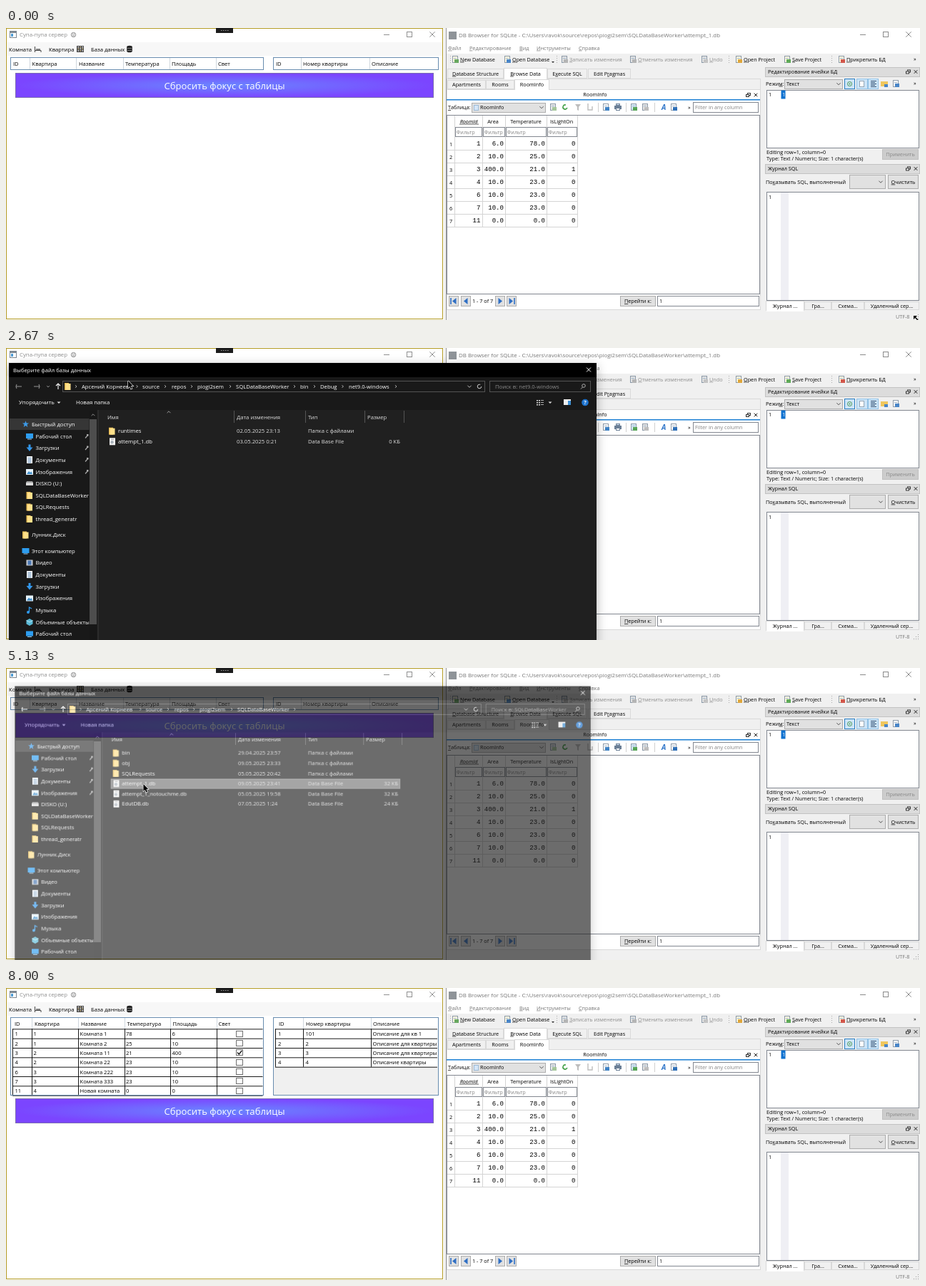
An HTML page with a canvas for the animation above (8.34 s loop, 1280 by 410 pixels).

```html
<!DOCTYPE html>
<html lang="ru">
<head>
<meta charset="utf-8">
<title>Супа-пупа сервер</title>
<style>
html, body { margin: 0; width: 100%; height: 100%; overflow: hidden; background: #fff; }
canvas { display: block; }
</style>
</head>
<body>
<canvas id="stage" width="1280" height="410"></canvas>
<script>
const LOOP = 8340, TICK = 200 / 3;
const UI = '"Open Sans", "Noto Sans", sans-serif';
const MONO = '"Liberation Mono", "DejaVu Sans Mono", monospace';
const stage = document.getElementById('stage').getContext('2d');
let g = stage;

// ---------- drawing helpers ----------
function rect(x, y, w, h, fill, stroke) {
  if (fill) { g.fillStyle = fill; g.fillRect(x, y, w, h); }
  if (stroke) { g.strokeStyle = stroke; g.lineWidth = 1; g.strokeRect(x + .5, y + .5, w - 1, h - 1); }
}
function line(color, width, ...p) {
  g.strokeStyle = color; g.lineWidth = width;
  g.beginPath();
  for (let i = 0; i < p.length; i += 2) g.lineTo(p[i], p[i + 1]);
  g.stroke();
}
function poly(color, ...p) {
  g.fillStyle = color;
  g.beginPath();
  for (let i = 0; i < p.length; i += 2) g.lineTo(p[i], p[i + 1]);
  g.fill();
}
function disc(x, y, r, fill, stroke) {
  g.beginPath(); g.arc(x, y, r, 0, 7);
  if (fill) { g.fillStyle = fill; g.fill(); }
  if (stroke) { g.strokeStyle = stroke; g.lineWidth = 1; g.stroke(); }
}
// y is the middle of the capitals; "&" underlines the next letter
function text(s, x, y, { size = 7.25, color = '#000', align = 'left', font = UI, style = '' } = {}) {
  const mark = s.indexOf('&'), plain = s.replace('&', ''), base = y + size * .36;
  g.font = `${style} ${size}px ${font}`;
  g.fillStyle = color; g.textAlign = align;
  g.fillText(plain, x, base);
  if (mark < 0) return;
  const left = align === 'center' ? x - g.measureText(plain).width / 2 : x;
  g.fillRect(left + g.measureText(plain.slice(0, mark)).width, base + 1, g.measureText(plain[mark]).width, .7);
}
function chevron(x, y, dir, color, r = 1.8) {
  const d = { '>': [-1, -2, 1, 0, -1, 2], 'v': [-2, -1, 0, 1, 2, -1], '^': [-2, 1, 0, -1, 2, 1] }[dir];
  line(color, .9, ...d.map((v, i) => (i % 2 ? y : x) + v * r / 2));
}
function cross(x, y, r, color) {
  line(color, 1, x - r, y - r, x + r, y + r);
  line(color, 1, x - r, y + r, x + r, y - r);
}
function caption(x, color) {
  rect(x - 68, 9, 8, 1, color);
  rect(x - 36, 5, 8, 8, null, color);
  cross(x, 9, 3.7, color);
}
function layer(paint, h = 410) {
  const c = document.createElement('canvas'), prev = g;
  c.width = 1280; c.height = h;
  g = c.getContext('2d');
  paint();
  g = prev;
  return c;
}

// ---------- icons ----------
function folder(x, y) {
  rect(x, y - 5, 6, 10, '#e9bd55');
  rect(x + 1.5, y - 4, 7, 9, '#ffe08a');
}
function dbFile(x, y) {
  rect(x + 1, y - 5, 8, 10, '#f4f4f4');
  disc(x + 4.5, y + 1, 2.2, '#a9b2bb');
  line('#8a8a8a', .7, x + 3, y - 3, x + 7, y - 3);
}
function page(x, y, dot, paper = '#fff') {
  rect(x - 4, y - 5, 8, 10, paper, '#8b99a8');
  rect(x - 2, y - 2, 4, 1, '#9fb4c9');
  rect(x - 1, y, 6, 5, dot);
}
function drum(x, y, color) {
  g.fillStyle = color;
  g.beginPath();
  g.ellipse(x, y - 3, 3.8, 1.8, 0, Math.PI, 0);
  g.ellipse(x, y + 3, 3.8, 1.8, 0, 0, Math.PI);
  g.fill();
}
const sideIcons = {
  star(x, y) {
    const p = [];
    for (let i = 0; i < 10; i++) {
      const r = i % 2 ? 2 : 4.8, a = i * Math.PI / 5 - Math.PI / 2;
      p.push(x + r * Math.cos(a), y + r * Math.sin(a));
    }
    poly('#3d9be9', ...p);
  },
  desk(x, y) { rect(x - 5, y - 4, 10, 7, '#2d9df0'); rect(x - 3, y + 3.5, 6, 1, '#9ed2f7'); },
  down(x, y) { rect(x - 1.5, y - 5, 3, 5, '#3397ec'); poly('#3397ec', x - 4.5, y - 1, x + 4.5, y - 1, x, y + 4.5); },
  doc(x, y) { rect(x - 4, y - 5, 8, 10, '#eef3f8'); for (let i = -3; i < 4; i += 2) rect(x - 2.5, y + i, 5, .8, '#5b87b5'); },
  pic(x, y) { rect(x - 5, y - 4, 10, 8, '#e6f3fb'); poly('#3e8ecb', x - 4, y + 3, x - 1, y - 1, x + 1, y + 1, x + 2.5, y - .5, x + 4, y + 3); },
  drive(x, y) { rect(x - 5, y - 1, 10, 4, '#d9d9d9'); poly('#9c9c9c', x - 4, y - 3, x + 4, y - 3, x + 5, y - 1, x - 5, y - 1); },
  dir(x, y) { folder(x - 4.5, y); },
  film(x, y) { rect(x - 4.5, y - 4, 9, 8, '#c9cdd2'); rect(x - 2.5, y - 3, 5, 6, '#4a78b5'); },
  note(x, y) { disc(x - 2, y + 3, 2, '#2f9bf0'); line('#2f9bf0', 1.3, x - .5, y + 3, x - .5, y - 4, x + 3, y - 2); },
  cube(x, y) { poly('#59b9d6', x, y - 5, x + 4.5, y - 2.5, x + 4.5, y + 2.5, x, y + 5, x - 4.5, y + 2.5, x - 4.5, y - 2.5); line('#d7f1f8', .8, x - 4.5, y - 2.5, x, y, x + 4.5, y - 2.5); }
};

// ---------- data ----------
const rooms = [
  [1, 1, 'Комната 1', 78, 6], [2, 1, 'Комната 2', 25, 10], [3, 2, 'Комната 11', 21, 400],
  [4, 2, 'Комната 22', 23, 10], [6, 3, 'Комната 222', 23, 10], [7, 3, 'Комната 333', 23, 10],
  [11, 4, 'Новая комната', 0, 0]
];
const flats = [[1, 101, 'Описание для кв 1'], [2, 2, 'Описание для квартиры 2'], [3, 3, 'Описание для квартиры 3'], [4, 4, 'Описание квартиры']];
const buildFiles = [['runtimes', '02.05.2025 23:13'], ['attempt_1.db', '03.05.2025 0:21', '0 КБ']];
const projectFiles = [
  ['bin', '29.04.2025 23:57'], ['obj', '09.05.2025 23:33'], ['SQLRequests', '05.05.2025 20:42'],
  ['attempt_1.db', '09.05.2025 23:41', '32 КБ'], ['attempt_1_notouchme.db', '05.05.2025 19:58', '32 КБ'],
  ['EdutDB.db', '07.05.2025 1:24', '24 КБ']
];
const crumbs = [['Арсений Корнеев', 106, 183.5], ['source', 191, 223], ['repos', 232, 260], ['piogi2sem', 268, 314],
  ['SQLDataBaseWorker', 322, 404], ['bin', 412, 432], ['Debug', 440, 471.5], ['net9.0-windows', 480, 546]];
const places = [
  ['star', 'Быстрый доступ', 107], ['desk', 'Рабочий стол', 124], ['down', 'Загрузки', 140.5], ['doc', 'Документы', 157],
  ['pic', 'Изображения', 174], ['drive', 'DISKO (U:)', 190], ['dir', 'SQLDataBaseWorker', 207], ['dir', 'SQLRequests', 223.5],
  ['dir', 'thread_generatr', 240], ['dir', 'Лунник.Диск', 262.5], ['desk', 'Этот компьютер', 285], ['film', 'Видео', 301.5],
  ['doc', 'Документы', 318], ['down', 'Загрузки', 335], ['pic', 'Изображения', 351.5], ['note', 'Музыка', 368],
  ['cube', 'Объемные объекты', 385], ['desk', 'Рабочий стол', 401.5]
];

// ---------- database browser (never changes) ----------
function field(x, y, w, h) { rect(x, y, w, h, '#fff', '#828790'); }
function button(x, y, w, h, label, color) {
  rect(x, y, w, h, '#e1e1e1', '#adadad');
  if (label) text(label, x + w / 2, y + h / 2, { align: 'center', color });
}
function dock(label, y) {
  rect(1063, y, 217, 14, '#dcdcdc', '#c2c2c2');
  text(label, 1067, y + 6.5);
  dockButtons(1263, y + 6.5);
}
function dockButtons(x, y) {
  rect(x - 1, y - 3, 5, 4, null, '#333');
  rect(x - 3, y - 1, 5, 4, '#eee', '#333');
  cross(x + 11, y, 2.3, '#222');
}
function tabs(list, y, h) {
  for (const [label, x, w, on] of list) {
    rect(x, y - (on ? 1 : 0), w, h + (on ? 2 : 0), on ? '#fff' : '#f0f0f0', '#d9d9d9');
    if (on) rect(x + 1, y + h - 1, w - 2, 3, '#fff');
    text(label, x + w / 2, y + h / 2, { align: 'center' });
  }
}
function browserToolbar() {
  const dim = '#8d8d8d';
  for (const [label, x, c, off] of [
    ['&New Database', 636, '#68a860'], ['&Open Database', 709, '#4a86c8'], ['&Записать изменения', 789, '#b5b5b5', 1],
    ['&Отменить изменения', 885, '#b5b5b5', 1], ['&Undo', 985, '#c4c4c4', 1], ['&Open Project', 1033, '#e0a73d'],
    ['&Save Project', 1101, '#5faa58'], ['&Прикрепить БД', 1177, '#d2574b']]) {
    page(x - 7, 44, c, off ? '#e4e4e4' : '#fff8e0');
    text(label, x, 44, { color: off ? dim : '#000' });
  }
  poly('#222', 764, 47, 768, 47, 766, 49);
  for (const x of [622, 771, 1012, 1156]) for (let y = 39; y < 51; y += 3) rect(x, y, 1, 1, '#aaa');
  text('»', 1271, 43.5);
}
function tablePane() {
  rect(617, 71, 440, 325, '#fff', '#d9d9d9');
  tabs([['&Database Structure', 618, 79], ['&Browse Data', 697, 61, 1], ['E&xecute SQL', 758, 56], ['Edit P&ragmas', 815, 60]], 57, 14);
  rect(618, 72, 438, 15, '#f0f0f0');
  tabs([['Apartments', 618, 54], ['Rooms', 672, 40], ['RoomInfo', 712, 49, 1]], 73, 13);
  line('#d9d9d9', 1, 617, 86.5, 712, 86.5); line('#d9d9d9', 1, 761, 86.5, 1056, 86.5);
  text('RoomInfo', 825, 93.5, { align: 'center' });
  dockButtons(1039, 94);
  rect(617, 100, 439, 1.5, '#1a7fd4');

  text('&Таблица:', 619, 111.5);
  button(652, 105, 104, 14);
  rect(655, 108, 7, 8, '#d5e6f7', '#9dbbd8');
  text('RoomInfo', 664, 111.5);
  chevron(750, 111.5, 'v', '#444', 2.6);
  page(766, 111, '#a5c79b', '#e8e8e8');
  g.beginPath(); g.arc(783, 111, 3, .3, 5); g.strokeStyle = '#43a047'; g.lineWidth = 1.6; g.stroke();
  poly('#bdbdbd', 797, 107, 805, 107, 802, 111, 802, 116, 800, 115, 800, 111);
  line('#bdbdbd', 1.4, 815, 106, 815, 115, 821, 115, 821, 110);
  page(840, 111, '#3f83c6');
  rect(852, 109, 10, 5, '#6b7f96'); rect(854, 106, 6, 3, '#d7e6f5', '#6b7f96'); rect(854, 112, 6, 4, '#fff', '#6b7f96');
  page(879, 111, '#57a657', '#d7ecf9'); page(895, 111, '#bdbdbd', '#e4e4e4');
  text('A', 918, 111, { size: 10, color: '#2e75c8', style: 'italic bold' });
  page(935, 111, '#2f70b8');
  for (const x of [829, 868, 908]) rect(x, 105, 1, 13, '#d0d0d0');
  text('»', 955, 111);
  field(962, 104, 92, 15);
  text('Filter in any column', 965, 111.5, { color: '#808080' });

  rect(617, 122, 439, 252, '#fff', '#828790');
  const cols = [628, 667, 699, 757, 800];
  [['RoomId', 648], ['Area', 682], ['Temperature', 728], ['IsLightOn', 778]].forEach(([s, x], i) => {
    text(s, x, 131, { align: 'center', style: i ? '' : 'italic' });
    if (!i) rect(635, 134.7, 27, .7, '#222');
    field(cols[i] + 1, 139, cols[i + 1] - cols[i] - 1, 14);
    text('Фильтр', cols[i] + 2.5, 146, { color: '#858585' });
  });
  for (const x of cols) rect(x, 123, 1, 156, '#d4d4d4');
  rooms.forEach(([id, , , temp, area], i) => {
    const y = 162 + i * 18;
    rect(618, y + 9, 183, 1, '#d4d4d4');
    text(String(i + 1), 621, y + 1);
    [id, area.toFixed(1), temp.toFixed(1), id === 3 ? 1 : 0].forEach((v, k) =>
      text(String(v), [664.5, 697, 755, 797.5][k], y, { size: 9.1, font: MONO, align: 'right' }));
  });

  for (const [x, dir, bar] of [[620, -1, 1], [637, -1], [685, 1], [701, 1, 1]]) {
    button(x, 376, 14, 15);
    const c = x + 7 + (bar ? dir * -1 : 0);
    poly('#2f6fc4', c + dir * 3, 383.5, c - dir * 2.5, 379, c - dir * 2.5, 388);
    if (bar) rect(x + 6.2 + dir * 4, 379, 1.6, 9, '#2f6fc4');
  }
  text('1 - 7 of 7', 653, 383.5);
  button(860, 376, 50, 15, '&Перейти к:');
  field(912, 376, 143, 15);
  text('1', 915, 383.5);
}
function cellPane() {
  dock('Редактирование ячейки БД', 55);
  text('Режи&м:', 1064, 78);
  button(1090, 72, 82, 14);
  text('Текст', 1093, 78.5);
  chevron(1166, 78.5, 'v', '#444', 2.6);
  rect(1174, 71, 15, 15, '#cce4f7', '#2a7cc0');
  disc(1181.5, 78.5, 3, null, '#4e9a4e'); disc(1181.5, 78.5, 1, '#4e9a4e');
  rect(1191, 71, 16, 15, '#cce4f7', '#90c0e4'); rect(1207, 71, 15, 15, '#cce4f7', '#90c0e4');
  rect(1195, 74, 7, 9, '#fff', '#93a5b5');
  for (let y = 74; y < 84; y += 2) rect(1211, y, y % 4 ? 8 : 6, 1, '#3b5878');
  rect(1225, 75, 10, 7, '#f0c75e'); rect(1230, 79, 5, 4, '#4a86c8');
  page(1246, 78, '#4a86c8');
  text('»', 1271, 77);
  field(1065, 87, 214, 82);
  text('1', 1068, 93.5);
  rect(1085.5, 87.5, 6, 12, '#0f72d0');
  text('1', 1087, 93.5, { color: '#fff' });
  text('Editing row=1, column=0', 1065, 174);
  text('Type: Text / Numeric; Size: 1 character(s)', 1065, 183);
  rect(1227, 170, 51, 15, '#ccc', '#bfbfbf');
  text('Применить', 1252.5, 177.5, { align: 'center', color: '#888' });
  dock('Журнал SQL', 191);
  text('По&казывать SQL, выполненный', 1064, 216);
  button(1181, 206, 51, 20);
  chevron(1225, 216, 'v', '#444', 2.6);
  button(1235, 206, 43, 20, '&Очистить');
  field(1065, 230, 214, 153);
  rect(1085, 231, 11, 151, '#efeff4');
  text('1', 1068, 237);
  tabs([['Журнал ...', 1064, 54, 1], ['Гра...', 1118, 38], ['Схема...', 1156, 46], ['Удаленный сер...', 1202, 77]], 384, 12);
  text('UTF-8', 1246, 405, { color: '#777' });
  for (let i = 0; i < 3; i++) for (let k = 0; k <= i; k++) rect(1277 - k * 3, 402 + i * 3, 1, 1, '#999');
}
const browser = layer(() => {
  rect(613, 0, 667, 410, '#f0f0f0');
  rect(617, 0, 663, 36, '#fff');
  rect(616, 0, 1, 410, '#9a9a9a');
  rect(620, 5, 11, 11, '#8f9499');
  text('DB Browser for SQLite - C:\\Users\\ravok\\source\\repos\\piogi2sem\\SQLDataBaseWorker\\attempt_1.db', 634, 10, { size: 7.9, color: '#777' });
  caption(1264, '#8a8a8a');
  [['&Файл', 619], ['&Редактирование', 649], ['&Вид', 719], ['&Инструменты', 743], ['&Справка', 802]]
    .forEach(([s, x]) => text(s, x, 28, { color: '#777' }));
  browserToolbar();
  tablePane();
  cellPane();
});

// ---------- server window ----------
function grid(x, w, heads, seps, filled) {
  const h = filled ? 110 : 18;
  rect(x, 41, w, h, filled ? '#f0f0f0' : '#fff');
  rect(x, 41, w, 17, '#fff');
  for (const s of seps) rect(s, 42, 1, 16, '#cfd6dd');
  for (const [label, tx] of heads) text(label, tx, 50.5, { size: 7.6 });
  return () => rect(x, 41, w, h, null, '#688caf');
}
function rows(list, x0, x1, seps, xs) {
  const top = 57.4, step = 13.33, h = list.length * step;
  rect(x0, top, x1 - x0, h, '#fff');
  for (let i = 0; i <= list.length; i++) rect(x0, top + i * step, x1 - x0, .9, '#000');
  for (const s of [x0, ...seps]) rect(s, top, .9, h, '#000');
  list.forEach((r, i) => xs.forEach((x, k) => text(String(r[k]), x, top + i * step + 7.1, { size: 7.6 })));
}
function tables(filled) {
  const names = ['ID', 'Квартира', 'Название', 'Температура', 'Площадь', 'Свет'], names2 = ['ID', 'Номер квартиры', 'Описание'];
  const heads = (n, xs) => n.map((s, i) => [s, xs[i]]);
  const seps = filled ? [36, 101, 166, 230, 295] : [33, 98, 164, 229, 294];
  const seps2 = filled ? [416, 511] : [413, 509];
  let frame = grid(6, 355, heads(names, filled ? [12, 40, 105, 169.5, 233.5, 297.5] : [10, 36.5, 102, 167, 232, 297]), seps, filled);
  if (filled) {
    rows(rooms, 9, 359.5, seps, [12.5, 38.5, 103.5, 168, 232.5]);
    rooms.forEach(([id], i) => {
      const y = Math.round(59.6 + i * 13.33);
      rect(322, y, 10, 9, '#fff', '#707070');
      if (id === 3) line('#111', 1.4, 324, y + 4.5, 326.3, y + 7, 330.3, y + 2);
    });
  }
  frame();
  frame = grid(374, 232, heads(names2, filled ? [382, 420, 514] : [378, 416, 512]), seps2, filled);
  if (filled) {
    g.save();
    g.beginPath(); g.rect(374, 41, 230, 110); g.clip();
    rows(flats, 377, 605, seps2, [381, 419.5, 513.5]);
    g.restore();
  }
  frame();
}
function focusButton(y, hover) {
  if (hover) rect(13, y, 586, 35, '#bee6fd', '#7fa9c9');
  else {
    g.save();
    g.beginPath(); g.rect(13, y, 586, 35); g.clip();
    g.translate(306, y + 17.5); g.scale(293, 17.5);
    const glow = g.createRadialGradient(0, 0, 0, 0, 0, 1);
    glow.addColorStop(0, '#6a86ff'); glow.addColorStop(1, '#7b45ff');
    g.fillStyle = glow; g.fillRect(-1, -1, 2, 2);
    g.restore();
    rect(13, y, 586, 35, null, '#7a6bb0');
  }
  text('Сбросить фокус с таблицы', 306, y + 18, { size: 13.1, color: '#fff', align: 'center' });
}
function inside(p, x, y, w, h) { return p.x >= x && p.x < x + w && p.y >= y && p.y < y + h; }
function server(t, p) {
  const active = t >= 925 && t < 2125 || t >= 5200 && t < 7995;
  const filled = t >= 5200, open = t >= 1000 && t < 2060, covered = t >= 2060 && t < 5200;
  const ink = active ? '#000' : '#8f8f8f';
  rect(0, 0, 613, 410, '#fff');
  rect(5, 4, 10, 10, '#fff', '#7d8790'); rect(5, 4, 10, 3, '#7d8790'); rect(7, 8, 3, 4, '#4b9ad4');
  text('Супа-пупа сервер', 19, 9.5, { size: 7.8, color: ink });
  disc(94.5, 9.5, 3.2, '#ededed', ink);
  rect(93, 8, 1, 1, ink); rect(95, 8, 1, 1, ink); rect(93, 10.5, 3, .8, ink);
  caption(597, ink);

  rect(1, 20, 611, 19, '#f7f7f7');
  if (open || !covered && inside(p, 114, 20, 69, 18)) rect(114, 20, 69, 18, '#bddcec', '#6db4da');
  text('Комната', 4, 30, { size: 7.7 }); text('Квартира', 60, 30, { size: 7.7 }); text('База данных', 119, 30, { size: 7.7 });
  line('#444', 1, 40.5, 26, 40.5, 34); line('#444', 1, 40, 31.5, 49, 31.5, 49, 34); rect(42, 29, 6, 2, '#888');
  rect(99, 25, 10, 9, '#444');
  for (let i = 0; i < 9; i++) rect(100.5 + i % 3 * 3, 26 + (i / 3 | 0) * 2.6, 1.6, 1.4, i % 2 ? '#f0d9a0' : '#fff');
  drum(173, 29.5, '#222'); rect(170, 28, 6, .7, '#aaa'); rect(170, 31, 6, .7, '#aaa');

  tables(filled);
  const by = filled ? 155 : 63;
  focusButton(by, !covered && !open && inside(p, 13, by, 586, 34));
  rect(0, 0, 612, 409, null, '#b39b24');

  if (open) {
    g.globalAlpha = Math.min(1, (t - 930) / 200);
    rect(114, 38, 175, 19, '#f0f0f0', '#999');
    if (inside(p, 114, 39, 175, 18)) rect(116, 40, 171, 15, '#c6e0ee', '#7dbbdc');
    text('Подключить базу данных', 141, 48, { size: 7.7 });
    line('#333', 3, 243.5, 50.5, 249, 45.5); line('#eee', 1, 244.5, 49.5, 248, 46.5);
    g.globalAlpha = 1;
  }
}

// ---------- file dialog ----------
function dialog(t, p) {
  const W = '#fff', lbl = (s, x, y, color = W, align) => text(s, x, y, { size: 7.7, color, align });
  const moved = t >= 3595, short = t >= 3665, picked = t >= 4925;
  rect(4, 21, 823, 450, '#191919');
  rect(4, 21, 823, 20, '#000');
  lbl('Выберите файл базы данных', 10, 31);
  cross(816, 30.5, 3, '#fff');

  const arrow = (x, d, c) => { line(c, 1.1, x - 4, 54, x + 4, 54); line(c, 1.1, x + d, 51, x + d * 4 / 3, 54, x + d, 57); };
  arrow(18, -3, moved ? '#fff' : '#8a8a8a'); arrow(43, 3, '#8a8a8a');
  chevron(59, 54, 'v', '#aaa');
  line('#fff', 1.1, 73, 58, 73, 50); line('#fff', 1.1, 70, 53, 73, 50, 76, 53);
  rect(79, 46, 592, 16, '#191919', '#535353');
  folder(82, 54);
  chevron(98, 54, '>', '#ccc');
  const hot = t >= 3195 && !short, pressed = t >= 3395 && !short;
  if (hot && !pressed) rect(320, 47, 89, 13, '#2f2f2f');
  crumbs.slice(0, short ? 5 : 8).forEach(([s, x, sep], i) => {
    const shift = i === 4 && pressed ? .8 : 0;
    lbl(s, x + shift, 54 + shift);
    chevron(sep, 54, i === 4 && t >= 3395 && t < 3865 ? 'v' : '>', '#ccc');
  });
  chevron(649, 54, 'v', '#ccc', 2.6);
  g.beginPath(); g.arc(663, 54, 2.8, 0, 5.2); g.strokeStyle = '#ccc'; g.lineWidth = 1; g.stroke();
  rect(677, 46, 142, 16, '#191919', '#535353');
  lbl('Поиск в: ' + (short ? 'SQLDataBaseWorker' : 'net9.0-windows'), 685, 54, '#8c8c8c');
  disc(809, 53, 2.3, null, '#aaa'); line('#aaa', 1, 807.5, 55, 805, 57.5);

  lbl('Упорядочить', 18, 76.5); poly('#ddd', 71.5, 75.5, 76.5, 75.5, 74, 78);
  lbl('Новая папка', 98, 76.5);
  for (const y of [73, 76, 79]) { rect(743, y, 2, 1.5, '#ddd'); rect(746, y, 2, 1.5, '#ddd'); rect(749, y, 4, 1, '#aaa'); }
  poly('#ddd', 759.5, 75.5, 764.5, 75.5, 762, 78);
  rect(781, 72, 10, 8, '#eee'); rect(787, 74, 4, 6, '#3b8fd4');
  disc(811, 76.5, 4.8, '#1e74cf');
  text('?', 811, 76.5, { size: 7.5, color: '#fff', align: 'center', style: 'bold' });

  rect(130, 87, 697, 384, '#202020');
  g.save();
  g.beginPath(); g.rect(4, 87, 112.5, 384); g.clip();
  rect(5, 99, 112, 16, '#363636');
  places.forEach(([icon, s, y]) => {
    const root = icon === 'star' || s.includes('.') || s.startsWith('Этот');
    sideIcons[icon](root ? 27.5 : 33, y);
    lbl(s, root ? 36 : 41.5, y);
    if (y > 120 && y < 180) { line('#aaa', 1.2, 111, y + 2.5, 114.5, y - 1.5); rect(113, y - 3, 2.5, 2.5, '#aaa'); }
  });
  g.restore();
  rect(117, 88, 10, 383, '#171717');
  rect(117, 100, 10, 288, '#4d4d4d');
  chevron(122, 94, '^', '#999', 2.4);
  rect(128, 87, 2, 384, '#2b2b2b');

  [['Имя', 142], ['Дата изменения', 323], ['Тип', 423], ['Размер', 506]].forEach(([s, x]) => lbl(s, x, 97, '#dedede'));
  for (const x of [319, 419, 502, 557]) rect(x, 88, 1, 17, '#555');
  chevron(228, 90, '^', '#aaa', 2.4);
  (moved ? projectFiles : buildFiles).forEach(([name, date, size], i) => {
    const y = 116.7 + i * 14.6, over = t > 4000 && inside(p, 140, y - 7.3, 415, 14.6);
    const fill = picked && i === 3 ? '#777' : over ? '#4d4d4d' : moved && !picked && i === 0 ? '#2f2f2f' : null;
    if (fill) rect(141, y - 7, 414, 14.2, fill);
    if (picked && i === 3) rect(141, Math.round(y - 7), 414, 14, null, '#8a8a8a');
    (size ? dbFile : folder)(144, y);
    lbl(name, 157, y);
    lbl(date, 323, y, '#dedede');
    lbl(size ? 'Data Base File' : 'Папка с файлами', 423, y, '#dedede');
    if (size) lbl(size, 552, y, '#dedede', 'right');
  });
}
// The shadow falls only outside the box, so a translucent box stays clear
function shadowAround(x, y, w, h) {
  g.save();
  g.beginPath(); g.rect(-50, -50, 1380, 600); g.rect(x, y, w, h); g.clip('evenodd');
  g.shadowColor = 'rgba(0,0,0,.3)'; g.shadowBlur = 14; g.shadowOffsetY = 4;
  rect(x, y, w, h, '#000');
  g.restore();
}
function showDialog(t, p) {
  const start = 2447, end = 5065;
  if (t < start || t > end + 200) return;
  const grow = 1 - (1 - Math.min(1, (t - start) / 200)) ** 3;
  const show = t < end ? grow : 1 - (t - end) / 200;
  const s = .94 + .06 * show, cx = 415.5, cy = 245;
  const pane = layer(() => dialog(t, p), 480);
  g.save();
  g.globalAlpha = show;
  g.translate(cx, cy); g.scale(s, s); g.translate(-cx, -cy);
  shadowAround(4, 21, 823, 450);
  g.drawImage(pane, 0, 0);
  g.restore();
}

// ---------- pointer ----------
const path = [[0, 1273, 405], [330, 800, 250], [670, 250, 80], [870, 150, 30], [930, 153, 33], [1470, 153, 33], [1800, 171, 46],
  [2730, 171, 46], [3070, 344, 53], [4000, 344, 53], [4330, 180, 110], [4530, 140, 150], [4730, 200, 190], [4867, 200, 190],
  [4933, 192, 163], [5400, 193, 163], [5533, 266, 205], [5800, 266, 205], [5933, 266, 211], [6133, 266, 211], [6530, 714, 122],
  [6930, 518, 288], [7067, 518, 288], [7200, 440, 263], [7467, 145, 412], [LOOP + 100, 145, 412]];
function pointerAt(t) {
  const i = path.findIndex(k => k[0] > t), [t0, x0, y0] = path[i - 1], [t1, x1, y1] = path[i];
  const u = (t - t0) / (t1 - t0);
  return { x: x0 + (x1 - x0) * u, y: y0 + (y1 - y0) * u };
}
function pointer({ x, y }) {
  if (x > 1270) {
    line('#000', 1.4, x - 1, y, x + 4, y + 5);
    poly('#000', x - 2, y - 1, x + 3, y - 1, x - 2, y + 4);
    return;
  }
  const shape = [0, 0, 0, 10, 2.3, 7.9, 4, 11.6, 5.6, 10.9, 4, 7.3, 7, 7.3].map((v, i) => v + (i % 2 ? y : x));
  line('#fff', 1.2, ...shape, x, y);
  poly('#000', ...shape);
}

function draw(t) {
  const p = pointerAt(t);
  g.drawImage(browser, 0, 0);
  server(t, p);
  showDialog(t, p);
  rect(294, 0, 24, 7, '#1c1c1c');
  for (let x = 301; x < 312; x += 3) rect(x, 3, 1.5, 1, '#999');
  pointer(p);
}

let last = -1;
function play(now) {
  const tick = Math.floor((now % LOOP + 4) / TICK);
  if (tick !== last) draw(tick * TICK);
  last = tick;
  requestAnimationFrame(play);
}
requestAnimationFrame(play);
</script>
</body>
</html>
```
